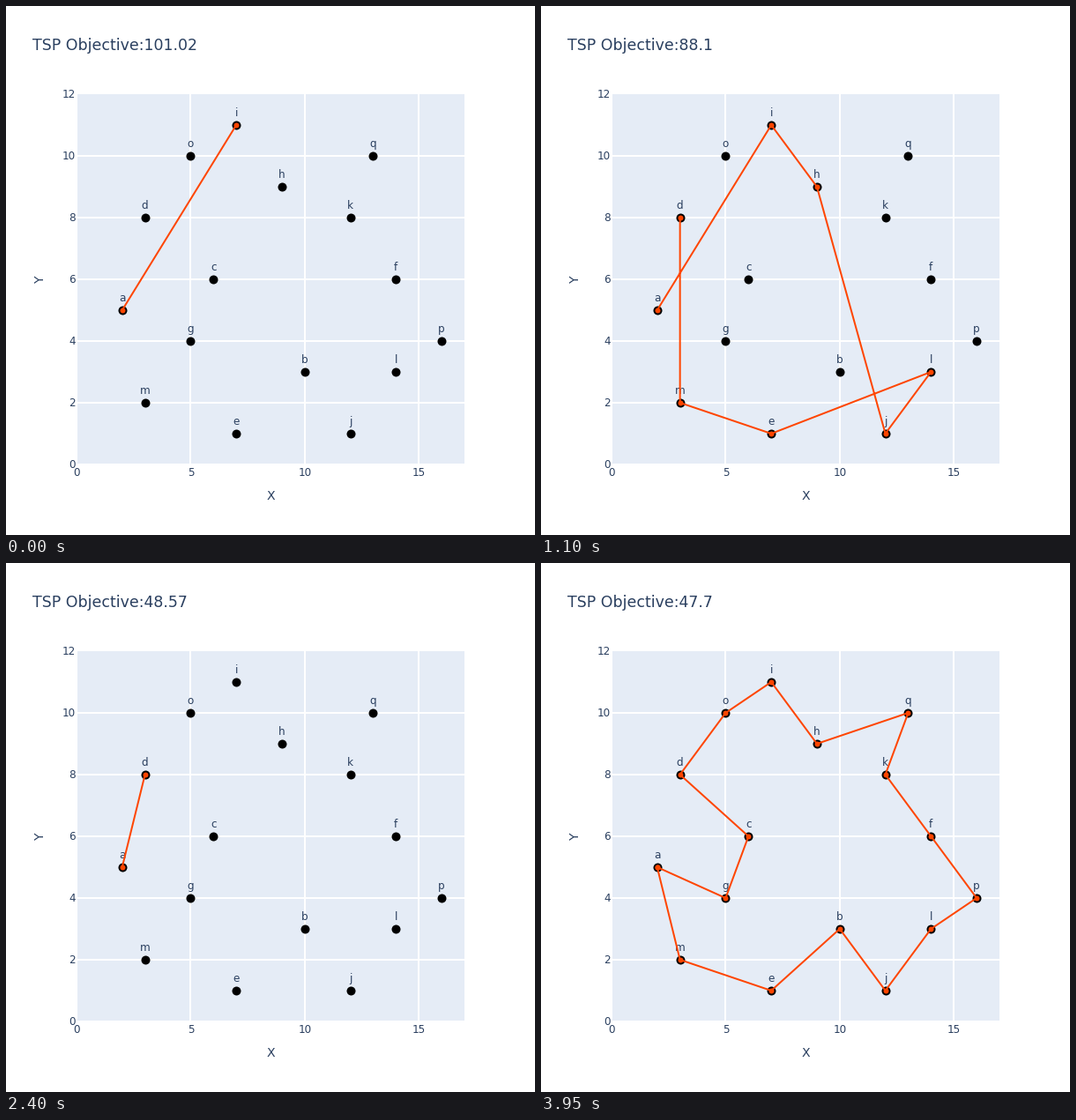
A matplotlib script that plays this animation: 600x600 px, repeating every 4000 ms.

```python
import math

import matplotlib.pyplot as plt
from matplotlib.animation import FuncAnimation
from matplotlib.patches import Rectangle

PX = 0.72  # points per pixel at 100 dpi
INK, PLOT_BG, ROUTE = "#2a3f5f", "#e5ecf6", "#ff4500"

NODES = dict(
    a=(2, 5), b=(10, 3), c=(6, 6), d=(3, 8), e=(7, 1), f=(14, 6),
    g=(5, 4), h=(9, 9), i=(7, 11), j=(12, 1), k=(12, 8), l=(14, 3),
    m=(3, 2), o=(5, 10), p=(16, 4), q=(13, 10),
)
TOURS = [
    "aihjgkflemdocpbq",
    "aihjlemdocgkfpbq",
    "adgmebpfjlkqhioc",
    "adoihqkfpljbegcm",
    "agcdoihqkfpljbem",
]
EDGES = len(NODES)

plt.rcParams["font.family"] = "DejaVu Sans"
fig = plt.figure(figsize=(6, 6), dpi=100, facecolor="white")
ax = fig.add_axes([0, 0, 1, 1])
ax.set_xlim(0, 600)
ax.set_ylim(600, 0)
ax.axis("off")


def to_px(x, y):
    return 80 + x * 440 / 17, 520 - y * 35


def label(x, y, text, size=12, ha="center", **kw):
    return ax.text(x, y, text, fontsize=size * PX, color=INK, ha=ha,
                   va=kw.pop("va", "baseline"), **kw)


def grid_line(xs, ys):
    ax.plot(xs, ys, color="white", lw=2 * PX, solid_capstyle="butt", zorder=1)


def tour_length(tour):
    return sum(math.dist(NODES[s], NODES[t])
               for s, t in zip(tour, tour[1:] + tour[0]))


ax.add_patch(Rectangle((80, 100), 440, 420, fc=PLOT_BG, lw=0, zorder=0))
for x in range(0, 16, 5):
    px = to_px(x, 0)[0]
    grid_line([px, px], [100, 520])
    label(px, 533, str(x))
for y in range(0, 13, 2):
    py = to_px(0, y)[1]
    if y < 12:
        grid_line([80, 520], [py, py])
    label(79, py + 4, str(y), ha="right")

label(300, 560, "X", 14)
label(39, 310, "Y", 14, rotation=90, va="center")
title = label(30, 50, "", 17.35, ha="left")

spots = {name: to_px(*xy) for name, xy in NODES.items()}
ax.plot(*zip(*spots.values()), "o", color="black", ms=10 * PX, mew=0, zorder=2)
for name, (x, y) in spots.items():
    label(x, y - 10, name, zorder=3)

route, = ax.plot([], [], "-o", color=ROUTE, lw=2 * PX, ms=6 * PX, mew=0,
                 zorder=4)


def update(n):
    step, edge = divmod(n, EDGES)
    tour = TOURS[step]
    path = (tour + tour[0])[:edge + 2]
    route.set_data(*zip(*(spots[s] for s in path)))
    title.set_text(f"TSP Objective:{round(tour_length(tour), 2)}")
    return route, title


anim = FuncAnimation(fig, update, frames=len(TOURS) * EDGES, interval=50,
                     repeat=True, repeat_delay=0)
plt.show()
```
